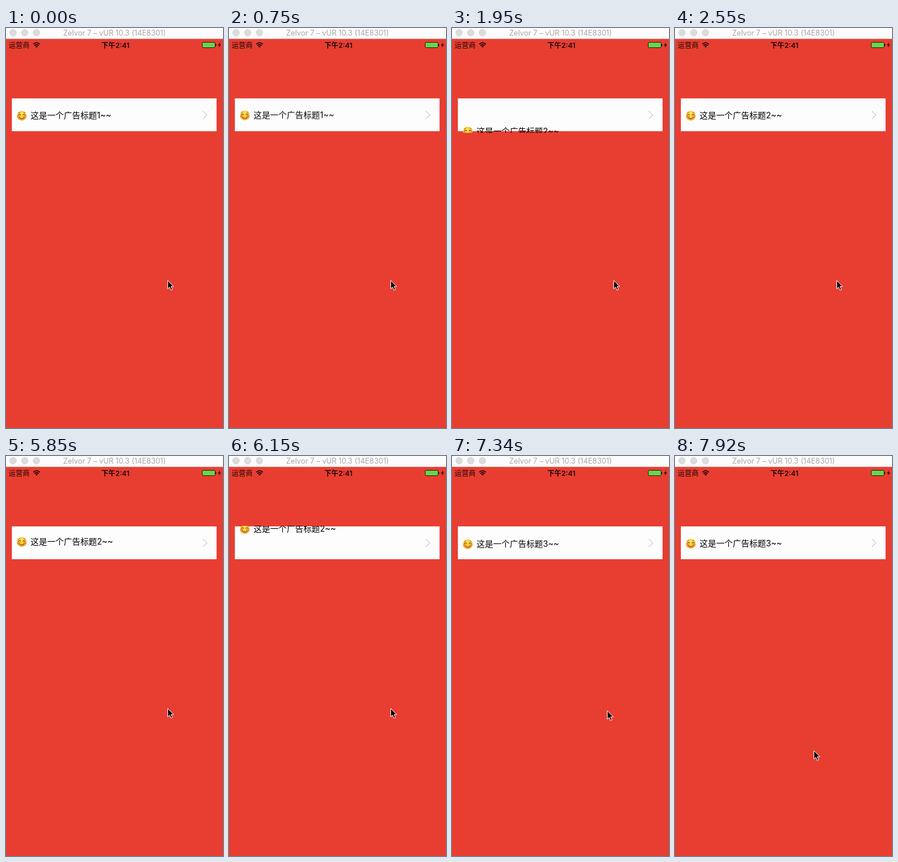
An HTML page that plays this animation: 371x682 px, repeating every 8000 ms.

```html
<!DOCTYPE html>
<html lang="zh-CN">
<head>
<meta charset="utf-8">
<title>Ad ticker</title>
<style>
  html, body { margin: 0; width: 100%; height: 100%; overflow: hidden; background: #e83e32; }
  svg { display: block; width: 371px; height: 682px; }
  text { font-family: Inter, "Noto Sans CJK SC", "Noto Sans CJK JP", "Noto Sans CJK", sans-serif; }
  .window-title { font-size: 12.6px; fill: #a8a8a8; text-anchor: middle; }
  .status { font-size: 12px; fill: #1c0705; }
  .clock { font-weight: 600; text-anchor: middle; }
  .headline { font-size: 14.2px; fill: #000; }

  /* The screen refreshes in coarse ticks, so every pose is held. */
  .ad, .pointer { animation: 8s step-end infinite; }
  .first { animation-name: first; }
  .second { animation-name: second; }
  .third { animation-name: third; }
  .pointer { animation-name: glide; }

  @keyframes first {
    0% { transform: translateY(0); }
    9.375% { transform: translateY(-.6px); }
    11.25% { transform: translateY(-5px); }
    13.125% { transform: translateY(-16px); }
    15% { transform: translateY(-30px); }
    16.875%, 100% { transform: translateY(-99px); }
  }
  @keyframes second {
    0% { transform: translateY(99px); }
    24.375% { transform: translateY(27px); }
    26.25% { transform: translateY(13px); }
    28.125% { transform: translateY(3px); }
    30% { transform: translateY(.3px); }
    31.875% { transform: translateY(0); }
    73.125% { transform: translateY(-3px); }
    75% { transform: translateY(-11px); }
    76.875% { transform: translateY(-25px); }
    78.75%, 100% { transform: translateY(-99px); }
  }
  @keyframes third {
    0% { transform: translateY(99px); }
    86.25% { transform: translateY(32px); }
    88.125% { transform: translateY(16px); }
    90% { transform: translateY(6px); }
    91.75% { transform: translateY(.8px); }
    93.625%, 100% { transform: translateY(0); }
  }
  @keyframes glide {
    0% { transform: translate(276px, 430px); }
    91.75% { transform: translate(265px, 434px); }
    93.625% { transform: translate(239px, 448px); }
    95.375% { transform: translate(236px, 490px); }
    97.25% { transform: translate(237px, 501px); }
    99%, 100% { transform: translate(237px, 502px); }
  }
</style>
</head>
<body>
<svg viewBox="0 0 371 682">
  <defs>
    <clipPath id="ticker"><rect x="10" y="119" width="350" height="60"/></clipPath>
    <radialGradient id="skin" cx=".5" cy=".35" r=".65">
      <stop offset="0" stop-color="#ffe75a"/>
      <stop offset=".65" stop-color="#fcc534"/>
      <stop offset="1" stop-color="#e8932a"/>
    </radialGradient>
    <g id="row">
      <circle cx="27" cy="149.5" r="8.3" fill="url(#skin)"/>
      <g fill="#f4722b" opacity=".65">
        <ellipse cx="21.8" cy="151.2" rx="2.7" ry="2"/>
        <ellipse cx="32.2" cy="151.2" rx="2.7" ry="2"/>
      </g>
      <g fill="none" stroke="#6b3d0e" stroke-width="1.1" stroke-linecap="round">
        <path d="M21.4 148.4q1.8-2.4 3.6 0M29 148.4q1.8-2.4 3.6 0M23 152.8q4 3.4 8 0"/>
        <path d="M21 144.8l2.6-1M33 144.8l-2.6-1" stroke-width=".7"/>
      </g>
      <text class="headline" x="42" y="154.3">这是一个广告标题</text>
    </g>
  </defs>

  <rect width="371" height="682" fill="#e83e32"/>

  <rect width="371" height="18" fill="#fcfcfc"/>
  <rect y="18" width="371" height="1" fill="#d8a29d"/>
  <g fill="#dcdcdc" stroke="#cfcfcf" stroke-width=".8">
    <circle cx="12" cy="8" r="5.6"/>
    <circle cx="32" cy="8" r="5.6"/>
    <circle cx="52" cy="8" r="5.6"/>
  </g>
  <text class="window-title" x="185.5" y="13">Zelvor 7 – vUR 10.3 (14E8301)</text>

  <text class="status" x="4.5" y="34">运营商</text>
  <g fill="none" stroke="#1c0705" stroke-width="1.7">
    <path d="M46.6 27.6q5.7-4.8 11.4 0M48.6 30q3.7-3 7.4 0"/>
    <path d="M50.2 31.4q2.1-1.6 4.2 0L52.3 33.6z" fill="#1c0705" stroke="none"/>
  </g>
  <text class="status clock" x="187" y="33.5">下午2:41</text>
  <rect x="335.5" y="24.5" width="22" height="9" rx="1.6" fill="#62d84e" stroke="#3a120d"/>
  <path d="M358.5 27.3q1.6 1.7 0 3.4z" fill="#1c0705" stroke="#1c0705" stroke-width=".6"/>
  <path d="M366 24.5l-3.8 5h2.5l-1 4 4.1-5.2h-2.6z" fill="#1c0705"/>

  <rect x="10" y="120" width="350" height="56" fill="#fdfdfd"/>
  <path d="M336.5 141.3l7 6.9-7 6.9" fill="none" stroke="#c7c7cc" stroke-width="1.1"/>

  <g clip-path="url(#ticker)">
    <g class="ad first"><use href="#row"/><text class="headline" x="155.4" y="154.3">1~~</text></g>
    <g class="ad second"><use href="#row"/><text class="headline" x="155.4" y="154.3">2~~</text></g>
    <g class="ad third"><use href="#row"/><text class="headline" x="155.4" y="154.3">3~~</text></g>
  </g>

  <path class="pointer" d="M.5.5v14.2l3.2-3 2.3 5.3 2.5-1.1-2.3-5.1h4.5z" fill="#000" stroke="#fff" stroke-width="1"/>
</svg>
</body>
</html>
```
